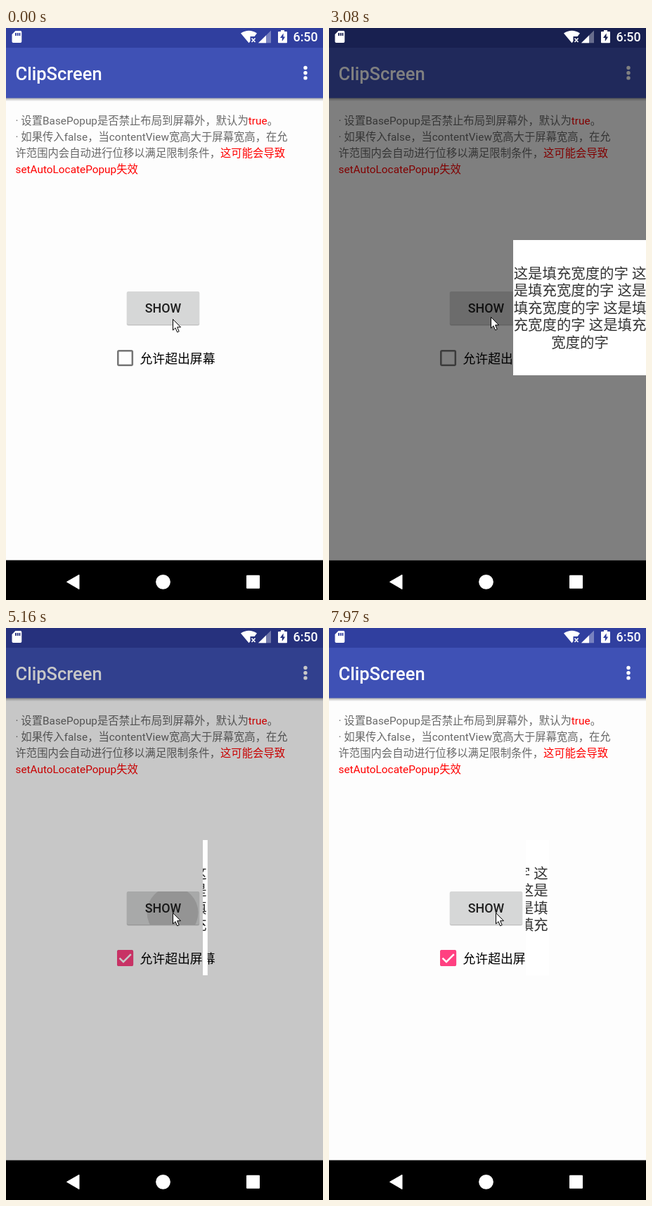
Write an HTML page that moves like this. It is 451 px wide and 812 px high and loops after 8000 ms.

```html
<!DOCTYPE html>
<html lang="zh-CN">
<head>
<meta charset="utf-8">
<title>ClipScreen</title>
<style>
html, body { margin: 0; width: 100%; height: 100%; overflow: hidden; background: #fdfdfd; }
svg { display: block; width: 451px; height: 812px; font-family: Roboto, "Noto Sans CJK SC", "Noto Sans CJK", sans-serif; }
text { white-space: pre; }
.medium { font-weight: 500; }
.note { font-size: 15.35px; fill: #696969; }
.red { fill: #f00; }
.popup { font-size: 20.4px; fill: #333; text-anchor: middle; }
</style>
</head>
<body>
<svg viewBox="0 0 451 812">
  <defs>
    <linearGradient id="barShadow" x2="0" y2="1">
      <stop stop-color="#000" stop-opacity=".34"/>
      <stop offset="1" stop-color="#000" stop-opacity="0"/>
    </linearGradient>
    <clipPath id="buttonClip"><rect x="172" y="374" width="103" height="47" rx="2.5"/></clipPath>
    <clipPath id="windowClip"><rect id="windowRect" y="301" width="192" height="192"/></clipPath>
  </defs>

  <rect width="451" height="756" fill="#fdfdfd"/>
  <rect y="99" width="451" height="5" fill="url(#barShadow)"/>
  <rect width="451" height="99.5" fill="#3f51b5"/>
  <rect width="451" height="28" fill="#303f9f"/>
  <text class="medium" x="13.5" y="74" font-size="25.5" fill="#fff">ClipScreen</text>
  <g fill="#fff">
    <circle cx="426" cy="56.5" r="2.7"/><circle cx="426" cy="63.7" r="2.7"/><circle cx="426" cy="70.9" r="2.7"/>
  </g>

  <g class="note">
    <text x="13.5" y="137">· 设置BasePopup是否禁止布局到屏幕外，默认为<tspan class="red">true</tspan>。</text>
    <text x="13.5" y="160">· 如果传入false，当contentView宽高大于屏幕宽高，在允</text>
    <text x="13.5" y="183">许范围内会自动进行位移以满足限制条件，<tspan class="red">这可能会导致</tspan></text>
    <text class="red" x="13.5" y="206">setAutoLocatePopup失效</text>
  </g>

  <rect x="171.5" y="374" width="104" height="48.8" rx="3" fill="#000" opacity=".1"/>
  <rect x="172" y="374.5" width="103" height="47.4" rx="2.5" fill="#000" opacity=".16"/>
  <rect x="172" y="374" width="103" height="47" rx="2.5" fill="#d6d7d7"/>
  <g clip-path="url(#buttonClip)"><circle id="buttonRipple"/></g>
  <text class="medium" x="223.5" y="404" font-size="17.85" fill="#1f1f1f" text-anchor="middle">SHOW</text>

  <circle id="checkRipple" cx="169.5" cy="468.5"/>
  <rect x="159.3" y="458.3" width="20.5" height="20.5" rx="1.5" fill="none" stroke="#757575" stroke-width="2.5"/>
  <g id="checked">
    <rect x="158" y="457" width="23.1" height="23.1" rx="2.5" fill="#ff4081"/>
    <path id="tick" d="M161.5 468.6 167 474 177.8 463.2" fill="none" stroke="#fff" stroke-width="2.5" pathLength="1" stroke-dasharray="1 2"/>
  </g>
  <text x="190.5" y="475.5" font-size="17.85" fill="#000">允许超出屏幕</text>

  <rect id="scrim" width="451" height="755.5"/>
  <g id="window" clip-path="url(#windowClip)">
    <g id="popup" class="popup">
      <rect y="301" width="191" height="192" fill="#fff"/>
    </g>
  </g>

  <g fill="#fff">
    <path fill-rule="evenodd" d="M13.5 4H20.5Q22.3 4 22.3 5.8V19.2Q22.3 21 20.5 21H10.3Q8.5 21 8.5 19.2V9ZM13 7V11H14.8V7ZM15.8 7V11H17.6V7ZM18.6 7V11H20.4V7Z"/>
    <path d="M334 7.5Q345.5 0 357 7.5L353.5 12H347.5V18.8L345.5 21.3Z"/>
    <path d="M349.5 14.5 354.5 20M354.5 14.5 349.5 20" stroke="#fff" stroke-width="1.6"/>
    <path d="M377 3.5V21.3H359Z" opacity=".35"/>
    <path d="M370 10.5V21.3H359Z"/>
    <path fill-rule="evenodd" d="M391 3H396V5H399Q400 5 400 6V20.3Q400 21.3 399 21.3H388Q387 21.3 387 20.3V6Q387 5 388 5H391ZM394.6 7.5 390 14H392.8V19L397.2 12.4H394.6Z"/>
    <text class="medium" x="408.5" y="19.3" font-size="17.85">6:50</text>
  </g>

  <rect y="755.5" width="451" height="56.5"/>
  <g fill="#fff">
    <path d="M86.5 786.3 104 776.3V796.5Z" stroke="#fff" stroke-linejoin="round"/>
    <circle cx="223.5" cy="786.3" r="10.4"/>
    <rect x="342" y="776.8" width="19" height="19" rx="1"/>
  </g>
  <path id="cursor" d="M.5 .5V16L4 12.7 6.6 18.8 9.2 17.7 6.6 11.7H11.5Z" fill="#fff" stroke="#000" stroke-width="1"/>
</svg>
<script>
const LOOP = 8000, POPUP_WIDTH = 191, SCRIM_ALPHA = 0.555;
const el = id => document.getElementById(id);
const set = (id, attrs) => Object.entries(attrs).forEach(([k, v]) => el(id).setAttribute(k, v));
const progress = (t, start, length) => Math.min(1, Math.max(0, (t - start) / length));
const smooth = p => (1 - Math.cos(Math.PI * p)) / 2;
const decelerate = p => 1 - (1 - p) ** 2;

// Text repeats without regard to words, wrapping at nine glyphs a line.
['这是填充宽度的字 这', '是填充宽度的字 这是', '填充宽度的字 这是填', '充宽度的字 这是填充', '宽度的字'].forEach((line, i) => {
  const text = document.createElementNS('http://www.w3.org/2000/svg', 'text');
  text.setAttribute('x', POPUP_WIDTH / 2);
  text.setAttribute('y', 356 + i * 24.4);
  text.textContent = line;
  el('popup').append(text);
});

const shows = [
  { x: 262, press: 940, open: 1070, close: 3066, tap: [230, 410] },
  { x: 280, press: 5105, open: 5105, close: 7650, tap: [237, 404] }
];
const cursorPath = [
  [20, 237, 413], [80, 230, 410], [3520, 230, 410], [3890, 204, 465], [3990, 197, 475],
  [4600, 197, 475], [4830, 255, 425], [5020, 237, 404], [LOOP, 237, 404]
];

function cursorAt(t) {
  const i = cursorPath.findIndex(key => key[0] >= t);
  if (i < 1) return cursorPath[0].slice(1);
  const [t0, x0, y0] = cursorPath[i - 1], [t1, x1, y1] = cursorPath[i];
  const p = (t - t0) / (t1 - t0);
  return [Math.round(x0 + (x1 - x0) * p), Math.round(y0 + (y1 - y0) * p)];
}

function drawPopup(t) {
  const show = t < 4500 ? shows[0] : shows[1];
  const entered = smooth(progress(t, show.open, 455));
  const left = smooth(progress(t, show.close, 440));
  const dim = decelerate(progress(t, show.open, 250)) - decelerate(progress(t, show.close, 262));
  const shift = POPUP_WIDTH * (entered - 1 - left);
  set('scrim', { opacity: SCRIM_ALPHA * dim });
  set('windowRect', { x: show.x });
  set('popup', { transform: `translate(${show.x + shift} 0)` });
  set('window', { visibility: entered > 0 && left < 1 ? 'visible' : 'hidden' });

  const [cx, cy] = show.tap;
  set('buttonRipple', {
    cx, cy,
    r: 85 * decelerate(progress(t, show.press, 225)),
    opacity: 0.12 * (1 - progress(t, show.press + 240, 200))
  });
}

function drawCheckbox(t) {
  const fill = progress(t, 4330, 120);
  set('checkRipple', {
    r: 25.3 * decelerate(progress(t, 4240, 200)),
    fill: t < 4330 ? '#000' : '#ff4081',
    opacity: 0.16 * (1 - progress(t, 4440, 260))
  });
  set('checked', { opacity: fill });
  set('tick', { 'stroke-dashoffset': 1 - progress(t, 4380, 150) });
}

function draw(t) {
  drawPopup(t);
  drawCheckbox(t);
  set('cursor', { transform: `translate(${cursorAt(t).join(' ')})` });
}

let start;
function tick(now) {
  start ??= now;
  draw((now - start) % LOOP);
  requestAnimationFrame(tick);
}
draw(0);
requestAnimationFrame(tick);
</script>
</body>
</html>
```
